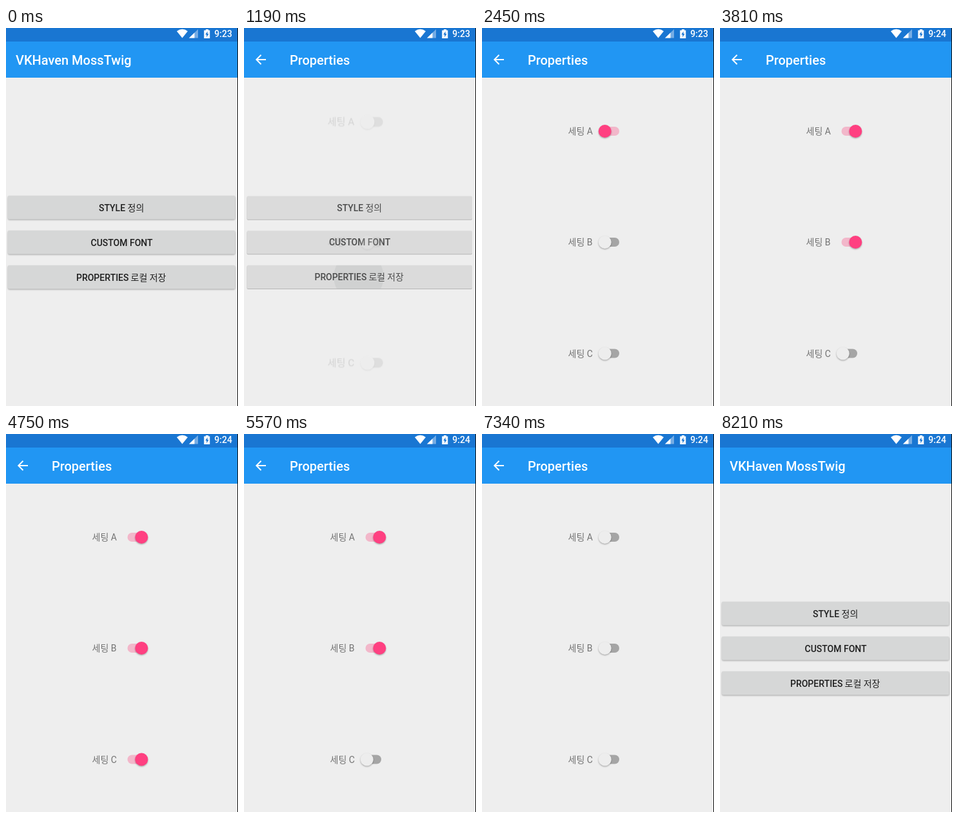
Animation of 360x586 px, one loop 9130 ms. Source, as an HTML page:

```html
<!DOCTYPE html>
<html lang="ko">
<head>
<meta charset="utf-8">
<title>Properties</title>
<style>
  html, body { margin: 0; width: 100%; height: 100%; overflow: hidden; background: #eee; }
  svg { display: block; width: 100%; height: 100%; }
  text { font-family: Roboto, "Noto Sans CJK KR", "Noto Sans CJK", sans-serif; font-size: 14px; white-space: pre; }
  .title { font-size: 20px; font-weight: 500; fill: #fff; }
  .btn { font-weight: 500; fill: #1f1f1f; }
  .ko { font-weight: 400; }
  .label { fill: #737373; }
</style>
</head>
<body>
<svg viewBox="0 0 360 586">
  <defs>
    <filter id="soft" x="-20%" y="-20%" width="140%" height="150%"><feGaussianBlur stdDeviation=".8"/></filter>
    <clipPath id="btnClip"><rect x="3" y="368" width="352.5" height="36.5" rx="2"/></clipPath>
  </defs>
  <rect width="360" height="586" fill="#eee"/>
  <g id="home"></g>
  <g id="props"></g>

  <rect width="360" height="21" fill="#1976d2"/>
  <rect y="21" width="360" height="56" fill="#2196f3"/>
  <g fill="#fff">
    <path d="M273.5 15.5L265 5Q273.5-1.5 282 5Z"/>
    <path d="M284 15.5H298V2Z" opacity=".4"/>
    <path d="M284 15.5H292.5V7.3Z"/>
    <path d="M308 3.5H310V2H314V3.5H316.3V16H307.3V3.5Z"/>
    <path d="M312.6 5.2L309.3 10.3H311.3V14.2L314.5 9H312.6Z" fill="#1976d2"/>
    <text id="clock" x="323.3" y="14" font-weight="500"></text>
  </g>
  <text id="homeTitle" class="title" x="15" y="56.5">VKHaven MossTwig</text>
  <g id="propsTitle">
    <path d="M34 49H19.5M26.5 41.8L19.3 49L26.5 56.2" fill="none" stroke="#fff" stroke-width="2"/>
    <text class="title" x="71" y="56.5">Properties</text>
  </g>
  <rect x="359" width="1" height="586" fill="#111"/>
</svg>
<script>
const LOOP = 9130, STEP = 70, CX = 179.5, CY = 332;
const $ = id => document.getElementById(id);
const clamp = v => Math.max(0, Math.min(1, v));
const show = (id, on) => $(id).setAttribute('display', on ? 'inline' : 'none');

const buttons = [
  [260, 144, 'STYLE', 188.5, '정의'],
  [314, 131.5, 'CUSTOM FONT', 0, ''],
  [368, 109, 'PROPERTIES', 193.5, '로컬 저장']
];
// row: label, centre y, time switched on, time switched off
const rows = [
  ['A', 160, 2450, 6990],
  ['B', 332, 3460, 6170],
  ['C', 504.5, 4400, 5220]
];

const box = (y, attrs) => `<rect x="3" y="${y}" width="352.5" height="36.5" rx="2" ${attrs}/>`;
const shadow = 'fill="#000" opacity=".3" filter="url(#soft)"';

$('home').innerHTML =
  buttons.map(([y]) => box(y + 1, shadow) + box(y, 'fill="#d6d7d7"')).join('') +
  '<circle id="ripple" cx="178" cy="386" fill="#000" opacity=".06" clip-path="url(#btnClip)"/>' +
  buttons.map(([y, x, en, kx, ko]) =>
    `<text class="btn" x="${x}" y="${y + 23.5}">${en}</text>` +
    (ko && `<text class="btn ko" x="${kx}" y="${y + 23.5}">${ko}</text>`)).join('');

$('props').innerHTML = rows.map(([name, y]) =>
  `<text class="label" x="133.5" y="${y + 5}">세팅 ${name}</text>
   <rect id="track${name}" x="188.5" y="${y - 7}" width="24.5" height="14" rx="7"/>
   <g id="thumb${name}">
     <circle cy="${y + 1.2}" r="10" ${shadow}/>
     <circle id="knob${name}" cy="${y}" r="10"/>
   </g>`).join('');

function place(id, scale, alpha) {
  show(id, alpha > 0);
  $(id).setAttribute('opacity', alpha);
  $(id).setAttribute('transform',
    `translate(${CX} ${CY}) scale(${scale}) translate(${-CX} ${-CY})`);
}

// screen motion is shown at these moments only
const moments = [0, 1060, 1190, 1260, 1330, 8000, 8070, 8140, 8210];
const held = t => moments.filter(m => m <= t).pop();
const decel = (p, power) => 1 - (1 - p) ** power;
const mix = (a, b, p) => a + (b - a) * p;

function slide(t, start) {
  const p = clamp(Math.floor((t - start) / STEP) * STEP / 250);
  return (1 - Math.cos(Math.PI * p)) / 2;
}

function screens(t) {
  const m = held(t), closing = m >= 8000;
  const p = m === 1330 ? 1 : clamp((m - (closing ? 7983 : 1173)) / 220);
  const size = decel(p, 5), fade = decel(p, 3);
  if (closing) {
    place('props', mix(1, 1.075, size), 1 - fade);
    place('home', mix(.975, 1, size), fade);
  } else {
    place('home', mix(1, .975, size), 1 - fade);
    place('props', mix(1.125, 1, size), fade);
  }
  const inProps = t >= 1190 && t < 8000;
  show('propsTitle', inProps);
  show('homeTitle', !inProps);
  show('ripple', m >= 1060 && m < 1330);
  $('ripple').setAttribute('r', Math.max(0, 20 + (m - 1060) * .148));
}

function switches(t) {
  for (const [name, , on, off] of rows) {
    const checked = t >= on && t < off;
    const x = 190.7 + 19.6 * (t < off ? slide(t, on) : 1 - slide(t, off));
    $('thumb' + name).setAttribute('transform', `translate(${x} 0)`);
    $('knob' + name).setAttribute('fill', checked ? '#ff4081' : '#ededed');
    $('track' + name).setAttribute('fill', checked ? '#f2b7ca' : '#a5a5a5');
  }
}

function draw(t) {
  screens(t);
  switches(t);
  $('clock').textContent = t < 3330 ? '9:23' : '9:24';
}

const begin = performance.now();
function tick() {
  draw((performance.now() - begin) % LOOP);
  requestAnimationFrame(tick);
}
tick();
</script>
</body>
</html>
```
